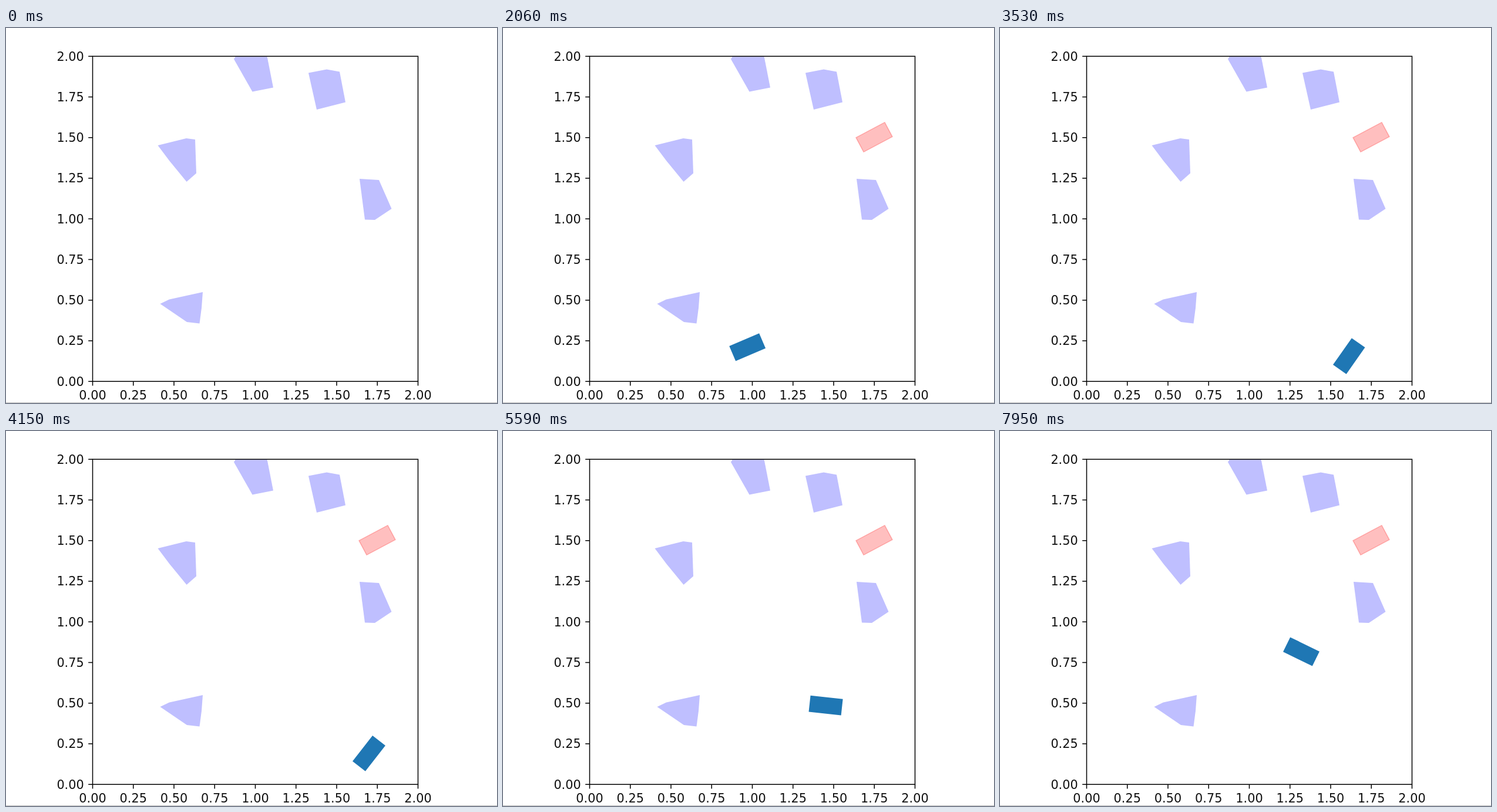
Animation of 836 by 639 pixels, one loop 8 s. Source, as an HTML page:

```html
<!DOCTYPE html>
<html lang="en">
<head>
<meta charset="utf-8">
<title>Path planning</title>
<style>
  html, body { margin: 0; width: 100%; height: 100%; overflow: hidden; background: #fff; }
  svg { display: block; width: 836px; height: 639px; }
  text { font: 20.8px "DejaVu Sans", sans-serif; fill: #111; }
</style>
</head>
<body>
<svg viewBox="0 0 836 639">
  <rect width="836" height="639" fill="#fff"/>
  <g fill="#bfbfff">
    <path d="M388 53L391 48H444.5L455 101.5L419.5 108.5Z"/>
    <path d="M515 76.5L546 70.5L568 74.5L578 126.5L529 139Z"/>
    <path d="M258.5 200L307 188L322 190L324 247.5L307.5 262L278 226Z"/>
    <path d="M602 257L635 259L656.5 308L628 327L611 326.5Z"/>
    <path d="M262.5 470L278 462.5L335 450L333 477L329.5 503.5L308 501Z"/>
  </g>
  <g id="moving">
    <rect x="-27.7" y="-13.85" width="55.4" height="27.7" transform="translate(632 186) rotate(-28)"
      fill="#f00" fill-opacity=".25" stroke="#f00" stroke-opacity=".25" stroke-width="1.6"/>
    <rect id="robot" x="-27.7" y="-13.85" width="55.4" height="27.7" fill="#1f77b4"/>
  </g>
  <g id="axes" stroke="#000" stroke-width="1.5" fill="none">
    <rect x="147.5" y="48.2" width="554" height="554"/>
  </g>
  <g id="labels"></g>
  <rect y="638" width="836" height="1" fill="#bdbdbd"/>
</svg>
<script>
const LOOP = 8000, APPEAR = 70;
const LEFT = 147.5, BOTTOM = 602.2, UNIT = 277;
const MOVE_START = 925, STEP_MS = 57, STEPS = 50;

// Poses as [x, y, counter-clockwise degrees]
const waypoints = [
  [286, 532.7, 0],
  [628.5, 562, 61],
  [497, 404.7, -51],
  [535, 336.3, 8.5]
];

// The display refreshes twelve times in each of these spans
const spans = [1020, 1850, 2690, 3530, 4360, 5170, 6010, 6840, 7680, 8490];

const $ = id => document.getElementById(id);

function add(parent, name, attributes, content = "") {
  const node = document.createElementNS("http://www.w3.org/2000/svg", name);
  for (const key in attributes) node.setAttribute(key, attributes[key]);
  node.textContent = content;
  parent.appendChild(node);
}

function drawAxes() {
  for (let i = 0; i <= 8; i++) {
    const value = i / 4;
    const x = LEFT + value * UNIT, y = BOTTOM - value * UNIT;
    const label = value.toFixed(2);
    add($("axes"), "path", { d: `M${x} ${BOTTOM}v7.3M${LEFT} ${y}h-7.3` });
    add($("labels"), "text", { x, y: 632.6, "text-anchor": "middle" }, label);
    add($("labels"), "text", { x: LEFT - 14.8, y: y + 7.4, "text-anchor": "end" }, label);
  }
}

function refreshTime(t) {
  if (t < spans[0]) return 0;
  const i = spans.findIndex(start => start > t) - 1;
  const interval = (spans[i + 1] - spans[i]) / 12;
  return spans[i] + interval * Math.floor((t - spans[i]) / interval + 1e-6);
}

function poseAt(t) {
  const step = Math.max(0, Math.floor((refreshTime(t) - MOVE_START) / STEP_MS));
  const leg = Math.floor(step / (STEPS + 1));
  const part = step % (STEPS + 1) / STEPS;
  return waypoints[leg].map((a, i) => a + (waypoints[leg + 1][i] - a) * part);
}

function render(t) {
  const [x, y, angle] = poseAt(t);
  $("moving").setAttribute("visibility", t < APPEAR ? "hidden" : "visible");
  $("robot").setAttribute("transform", `translate(${x} ${y}) rotate(${-angle})`);
}

drawAxes();
render(0);
const begin = performance.now();
function tick() {
  render((performance.now() - begin) % LOOP);
  requestAnimationFrame(tick);
}
requestAnimationFrame(tick);
</script>
</body>
</html>
```
